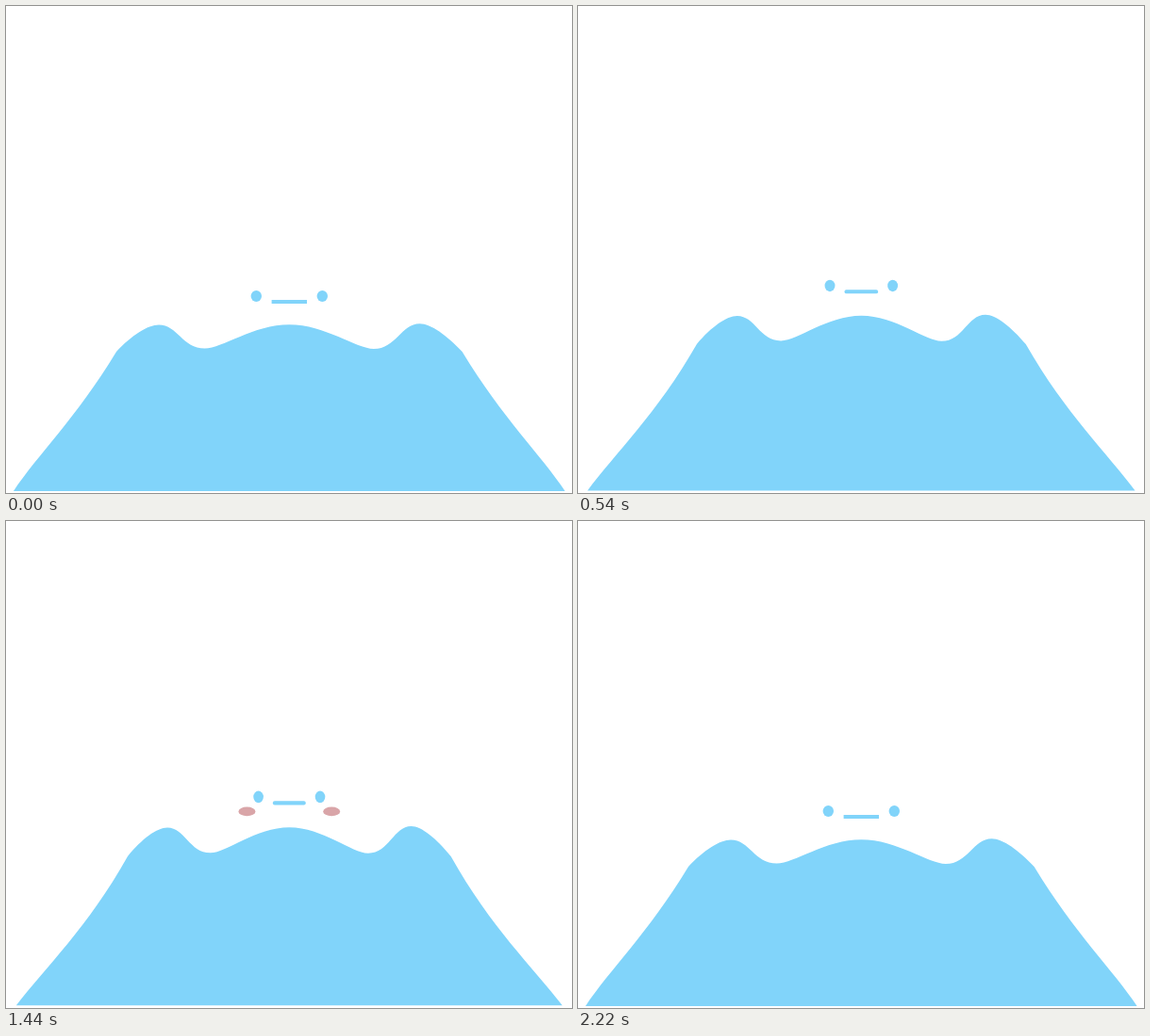
Recreate the animation shown at these times as an HTML page with a canvas. Size 600 by 517 pixels, loop 2400 ms.

```html
<!DOCTYPE html>
<html lang="en">
<head>
<meta charset="utf-8">
<title>Bouncing blob</title>
<style>
  html, body { margin: 0; width: 100%; height: 100%; overflow: hidden; background: #fff; }
  canvas { display: block; width: 600px; height: 517px; }
</style>
</head>
<body>
<canvas id="stage" width="600" height="517"></canvas>
<script>
const ctx = document.getElementById('stage').getContext('2d');
const LOOP = 2400, STEP = 30;
const MID = 300.3, BASE = 515, CREST = 338.3;
const STRETCH = 0.108;
const BLUE = '#81d4fa', PINK = '#d9a5a8';

// [time, stretch]: 0 at rest, below squashed, above stretched
const KEYS = [[150, 0], [330, -0.755], [660, 1], [1200, 1], [1800, 0]];

const ramp = (t, a, b) => Math.min(1, Math.max(0, (t - a) / (b - a)));
const ease = u => u * u * (3 - 2 * u);

function stretchAt(t) {
  let s = 0;
  for (let i = 1; i < KEYS.length; i++) {
    const [t0, s0] = KEYS[i - 1], [t1, s1] = KEYS[i];
    s += (s1 - s0) * ease(ramp(t, t0, t1));
  }
  return s;
}

// Taller means narrower; the foot hardly changes its width.
function place(dx, y, s) {
  const h = BASE - y;
  const grip = Math.min(1, 0.14 + h / 110);
  return [MID + dx / (1 + STRETCH * s * grip), BASE - s - h * (1 + STRETCH * s)];
}

// Half an outline from foot to crest: distance from the middle and height.
const outline = (peak, valley) => [
  [292.3, BASE], [267.3, 477], [226.3, 438],
  [183.3, 367], [167, 349.5], [150, peak],
  [138.3, peak], [118.3, peak], [113.3, valley],
  [89.5, valley], [71, valley], [38, CREST],
  [0, CREST]
];
const LEFT = outline(338.5, 363.6).map(([dx, y]) => [-dx, y]);
const RIGHT = outline(337.2, 364).reverse().slice(1);
const BODY = [...LEFT, ...RIGHT];

function drawBody(s) {
  const [foot, ...curve] = BODY.map(([dx, y]) => place(dx, y, s));
  ctx.beginPath();
  ctx.moveTo(...foot);
  for (let i = 0; i < curve.length; i += 3) {
    ctx.bezierCurveTo(...curve.slice(i, i + 3).flat());
  }
  ctx.fill();
}

function drawPair(dx, y, rx, ry, s) {
  const k = 1 + STRETCH * s;
  for (const side of [-1, 1]) {
    ctx.beginPath();
    ctx.ellipse(...place(side * dx, y, s), rx / k, ry * k, 0, 0, Math.PI * 2);
    ctx.fill();
  }
}

function drawMouth(s) {
  const thick = 4 * (1 + STRETCH * s);
  const [x, y] = place(-18.7, 314, s);
  ctx.beginPath();
  ctx.roundRect(x, y - thick / 2, 2 * (MID - x), thick, Math.min(2, 4 * Math.abs(s)));
  ctx.fill();
}

function draw(t) {
  const s = stretchAt(t);
  ctx.globalAlpha = 1;
  ctx.fillStyle = '#fff';
  ctx.fillRect(0, 0, 600, 517);
  ctx.fillStyle = BLUE;
  drawBody(s);
  drawPair(35, 308, 5.7, 5.9, s);
  drawMouth(s);
  ctx.globalAlpha = ramp(t, 990, 1290) * (1 - ramp(t, 1800, 2220));
  ctx.fillStyle = PINK;
  drawPair(48, 322.5, 9.6, 4.6, s);
}

const began = performance.now();
function tick() {
  const t = (performance.now() - began) % LOOP;
  draw(Math.floor(t / STEP) * STEP);
  requestAnimationFrame(tick);
}
tick();
</script>
</body>
</html>
```
